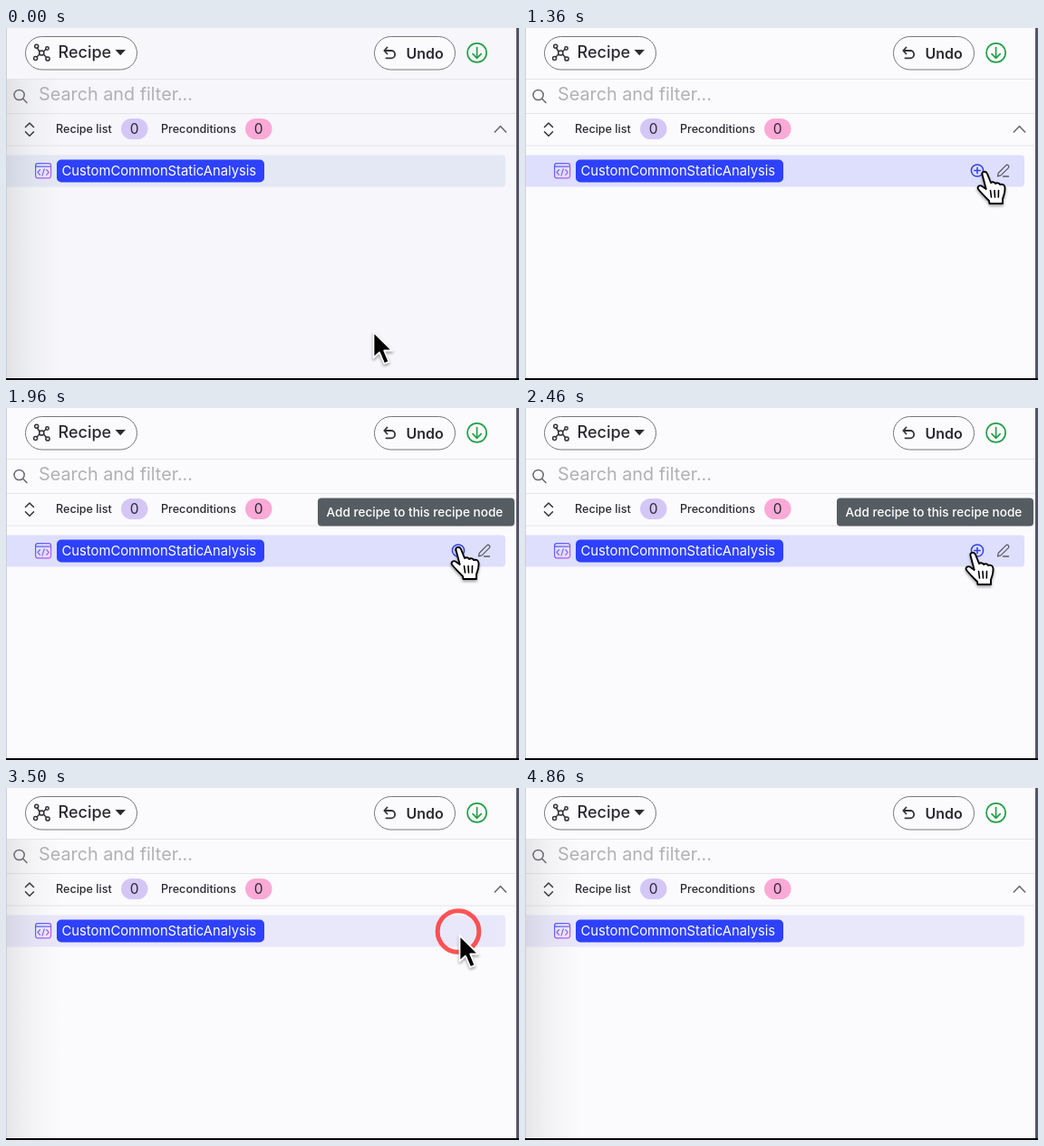
Recreate the animation shown at these times as an HTML page. Size 566 by 389 pixels, loop 5800 ms.

```html
<!DOCTYPE html>
<html lang="en">
<head>
<meta charset="utf-8">
<title>Recipe builder</title>
<style>
  html, body { margin: 0; width: 100%; height: 100%; overflow: hidden; background: #fbfafd; }
  svg { display: block; width: 566px; height: 389px; }
  text { font-family: Inter, sans-serif; fill: #2b2a33; }
  .line { fill: none; stroke: #333238; stroke-width: 1.5; stroke-linecap: round; stroke-linejoin: round; }
  .rule { stroke: #e5e4ea; }
  .button { fill: #fbfbfd; stroke: #77767d; }
  .small { font-size: 12.6px; font-weight: 500; }
  .count { font-size: 15.5px; text-anchor: middle; }
  .cursor { stroke-linejoin: round; filter: drop-shadow(0 2px 1.5px rgba(0,0,0,.35)); }
</style>
</head>
<body>
<svg viewBox="0 0 566 389">
  <defs>
    <linearGradient id="edge">
      <stop offset="0" stop-color="#77777c" stop-opacity=".16"/>
      <stop offset=".5" stop-color="#88908c" stop-opacity=".06"/>
      <stop offset="1" stop-color="#88908c" stop-opacity="0"/>
    </linearGradient>
    <linearGradient id="code" x1="0" y1="0" x2="1" y2="1">
      <stop offset="0" stop-color="#4a5cff"/>
      <stop offset="1" stop-color="#c65cf0"/>
    </linearGradient>
  </defs>

  <rect id="page" width="566" height="389"/>

  <!-- toolbar -->
  <rect class="button" x="21.5" y="9.5" width="123" height="36.5" rx="18.2"/>
  <g class="line" stroke-width="1.3">
    <path d="M37 26 34.5 22M41.5 26 44 23.5M37 29 34 32M41.5 29 44.5 32.5"/>
    <circle cx="39.3" cy="27.5" r="2.6"/>
    <circle cx="33.7" cy="20.3" r="2"/>
    <circle cx="45.5" cy="22.5" r="1.7"/>
    <circle cx="32.6" cy="33.6" r="2"/>
    <circle cx="46" cy="34" r="2.1"/>
  </g>
  <text x="57.5" y="33" font-size="18" font-weight="500">Recipe</text>
  <path d="M120.5 24h11.5l-5.8 6.2z" fill="#2b2a33"/>
  <rect class="button" x="406.5" y="9.5" width="89" height="36.5" rx="18.2"/>
  <path class="line" style="stroke-width:1.8" d="M420.5 21.5 417.3 25 420.5 28.5M417.5 25h7.5a4 4 0 0 1 0 8.3h-5.5"/>
  <text x="441.5" y="33.5" font-size="16" font-weight="600">Undo</text>
  <g class="line" style="stroke:#24a148;stroke-width:1.7">
    <circle cx="519.6" cy="27.4" r="10.5"/>
    <path d="M519.6 21.5v11.5M515 28.7l4.6 4.6 4.6-4.6"/>
  </g>
  <path class="rule" d="M0 56.5h563M0 94.5h563M0 130h563"/>

  <!-- search -->
  <g class="line" style="stroke:#69686f">
    <circle cx="14.6" cy="74" r="5.6"/>
    <path d="M18.8 78.2 23 82.5"/>
  </g>
  <text x="36" y="80" font-size="19.8" style="fill:#b2b0b3">Search and filter...</text>

  <!-- list header -->
  <path class="line" d="M21.5 109.5 26 105l4.5 4.5M21.5 114.8l4.5 4.5 4.5-4.5"/>
  <text class="small" x="55" y="116">Recipe list</text>
  <rect x="127" y="100" width="29.5" height="23" rx="11.5" fill="#d4c7f6"/>
  <text class="count" x="141.7" y="117">0</text>
  <text class="small" x="171" y="116">Preconditions</text>
  <rect x="264" y="100" width="29.5" height="23" rx="11.5" fill="#fba9d6"/>
  <text class="count" x="278.7" y="117">0</text>
  <path class="line" style="stroke:#66656c" d="M539.3 115l6.2-6.5 6.2 6.5"/>

  <!-- selected row -->
  <path id="row" d="M1 140.5h546a4 4 0 0 1 4 4v27a4 4 0 0 1-4 4H1z"/>
  <rect id="shade" x="1" y="57" width="60" height="330" fill="url(#edge)"/>
  <g class="line" style="stroke:url(#code);stroke-width:1.2">
    <rect x="32.6" y="149.6" width="17" height="16.2" rx="2.5"/>
    <path d="M33 153.2h16.200l.1.1M37.500 156.700l-2.500 2.800 2.500 2.800M44.700 156.700l2.500 2.800-2.500 2.800M42.200 155.800l-2.200 7.400"/>
  </g>
  <rect x="56" y="145.500" width="229" height="25" rx="5" fill="#2d41ff"/>
  <text x="61.500" y="162.600" font-size="14.800" style="fill:#fff">CustomCommonStaticAnalysis</text>

  <g id="actions">
    <g class="line" style="stroke:#3040e8">
      <circle cx="499" cy="157.500" r="6.600"/>
      <path d="M495.800 157.500h6.400M499 154.300v6.400"/>
    </g>
    <path class="line" style="stroke:#5c5b66;stroke-width:1.300" d="M521.500 163.800l.8-3.600 8.300-8.300a1.800 1.800 0 0 1 2.700 2.700l-8.300 8.300zM527.500 164h6"/>
  </g>

  <g id="tooltip">
    <rect x="344" y="99.500" width="217" height="31" rx="4" fill="#555d62"/>
    <text x="353.500" y="119.500" font-size="13.600" font-weight="500" style="fill:#fff">Add recipe to this recipe node</text>
  </g>

  <circle id="ring" cx="499" cy="158.500" fill="none" stroke="#ff2424" stroke-width="5"/>

  <g class="cursor" id="arrow">
    <path d="M.5 1v28.500l6.500-6 5.300 12.500 5.200-2.200-5.300-12.300h9z" fill="#000" stroke="#fff" stroke-width="1.800"/>
  </g>
  <g class="cursor" id="hand">
    <g transform="translate(-10 -4)" fill="none" stroke="#000" stroke-width="1.900" stroke-linecap="round">
      <path fill="#fff" d="M6.500 4C5.500.5 10.500-.5 12 3l4 10c2-1.500 4.500-.5 5 1 2-1.500 4.500-.5 5 1 3-1 5.500.5 5.500 3.500.5 6.500-2 9.500-2.500 12.500v5H14.500L14 33C10 29 5 24 2 20c-1.500-3 2-5 4.500-3l4.200 3z"/>
      <path d="M15.500 21.500l1 7.500M20 21.500l.5 7.500M24.500 21.500l-.2 7.500" stroke-width="1.600"/>
    </g>
  </g>

  <!-- window frame -->
  <path d="M.5 0v387" stroke="#cfced6"/>
  <rect x="563" width="3" height="389" fill="#555466"/>
  <rect y="387" width="566" height="2" fill="#000"/>
</svg>

<script>
const LOOP = 5800;
const el = id => document.getElementById(id);
const clamp = v => Math.max(0, Math.min(1, v));
const ramp = (t, from, to) => clamp((t - from) / (to - from));

// Pointer hot spot: [time, x, y]
const path = [
  [0, 405, 335], [330, 405, 335], [760, 466, 265], [900, 476, 235],
  [1360, 508, 162], [1500, 508, 163], [1960, 500, 157], [2200, 498, 169],
  [2460, 495, 163], [2630, 500, 162], [4400, 500, 162], [4860, 405, 392], [LOOP, 405, 392]
];

const rowColors = [
  [0, 228, 232, 245], [30, 228, 232, 245], [60, 231, 232, 250], [330, 231, 232, 250],
  [650, 207, 214, 252], [1180, 207, 214, 252], [1330, 222, 223, 253],
  [2930, 222, 223, 253], [3200, 233, 232, 251], [LOOP, 233, 232, 251]
];

// Monotone cubic interpolation of column c, so that rests stay at rest
function track(keys, t, c) {
  const slope = i => i < 0 || i > keys.length - 2 ? 0
    : (keys[i + 1][c] - keys[i][c]) / (keys[i + 1][0] - keys[i][0]);
  const tangent = i => {
    const a = slope(i - 1), b = slope(i);
    return a * b > 0 ? 2 * a * b / (a + b) : 0;
  };
  let i = 0;
  while (i < keys.length - 2 && t >= keys[i + 1][0]) i++;
  const span = keys[i + 1][0] - keys[i][0];
  const u = (t - keys[i][0]) / span, v = 1 - u;
  return v * v * (1 + 2 * u) * keys[i][c] + u * u * (3 - 2 * u) * keys[i + 1][c]
    + span * u * v * (v * tangent(i) - u * tangent(i + 1));
}

function draw(t) {
  el('page').setAttribute('fill', t < 30 ? '#f6f6fb' : '#fbfafd');
  el('row').setAttribute('fill', `rgb(${[1, 2, 3].map(c => Math.round(track(rowColors, t, c)))})`);
  el('shade').setAttribute('opacity', 1 - ramp(t, 330, 650) + ramp(t, 2930, 3200));
  el('actions').setAttribute('opacity', ramp(t, 1220, 1330) - ramp(t, 2930, 3050));
  el('tooltip').setAttribute('opacity', ramp(t, 1380, 1500) - ramp(t, 2930, 3050));

  const pulse = ramp(t, 2930, 4130);
  el('ring').setAttribute('r', 48 * pulse);
  el('ring').setAttribute('opacity', pulse > 0 ? 1 - pulse * pulse : 0);

  const pointing = t >= 1280 && t < 2930;
  const place = `translate(${track(path, t, 1)} ${track(path, t, 2)})`;
  for (const [id, shown] of [['arrow', !pointing && t < 4860], ['hand', pointing]]) {
    el(id).setAttribute('transform', place);
    el(id).style.display = shown ? '' : 'none';
  }
}

const start = performance.now();
function tick() {
  draw((performance.now() - start) % LOOP);
  requestAnimationFrame(tick);
}
tick();
</script>
</body>
</html>
```
